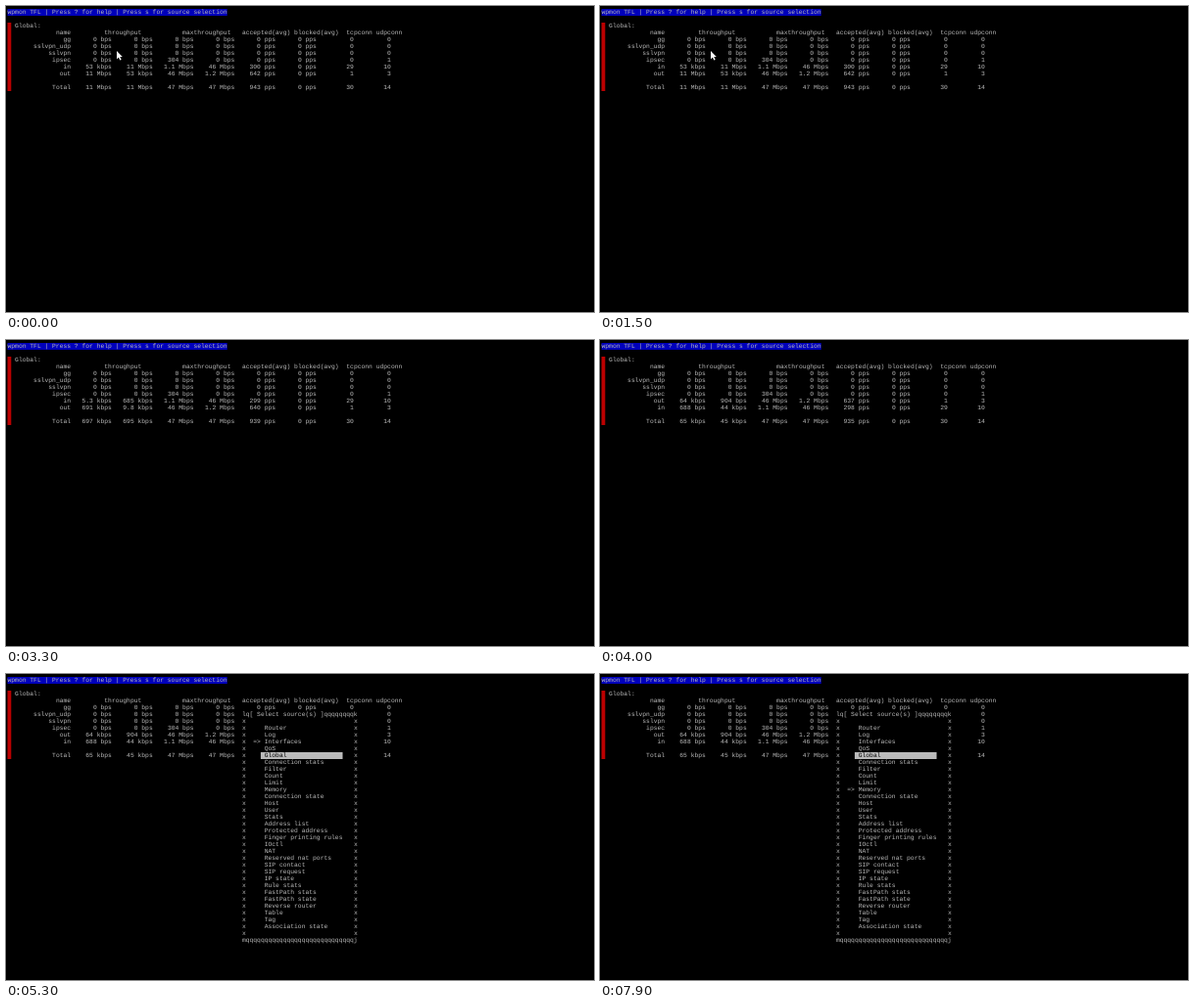
These frames come from a looping animation (600x313 px, 8000 ms). An HTML page:

```html
<!DOCTYPE html>
<html lang="en">
<head>
<meta charset="utf-8">
<title>Traffic monitor</title>
<style>
html, body { margin: 0; width: 100%; height: 100%; overflow: hidden; background: #000; }
svg { display: block; width: 600px; height: 313px; }
text {
  font-family: "Liberation Mono", monospace;
  font-size: 6.3323px;
  fill: #bbb;
  white-space: pre;
  text-rendering: geometricPrecision;
}
.dark { fill: #000; }
</style>
</head>
<body>
<svg id="stage" viewBox="0 0 600 313"></svg>
<script>
const LOOP = 8000;
const CELL = 3.8, LINE = 7, LEFT = 1.5, TOP = 3;
const MENU_AT = 4200;
const MENU_COL = 63, MENU_ROW = 5, MENU_WIDTH = 31;
const SELECTED = 4;

const stage = document.getElementById("stage");

// Right edge of each table column, in character cells
const edges = [17, 28, 39, 50, 61, 72, 83, 93, 103];
const heads = [[13, "name"], [26, "throughput"], [47, "maxthroughput"],
  [63, "accepted(avg)"], [77, "blocked(avg)"], [91, "tcpconn"], [99, "udpconn"]];

const idle = (name, peak = "0 bps", udp = "0") =>
  [name, "0 bps", "0 bps", peak, "0 bps", "0 pps", "0 pps", "0", udp];
const inRow = (a, b, pps) => ["in", a, b, "1.1 Mbps", "46 Mbps", pps, "0 pps", "29", "10"];
const outRow = (a, b, pps) => ["out", a, b, "46 Mbps", "1.2 Mbps", pps, "0 pps", "1", "3"];
const total = (a, b, pps) => ["Total", a, b, "47 Mbps", "47 Mbps", pps, "0 pps", "30", "14"];
const quiet = [idle("gg"), idle("sslvpn_udp"), idle("sslvpn"), idle("ipsec", "304 bps", "1")];

const samples = [
  { at: 0, rows: [inRow("53 kbps", "11 Mbps", "300 pps"),
                  outRow("11 Mbps", "53 kbps", "642 pps"), [],
                  total("11 Mbps", "11 Mbps", "943 pps")] },
  { at: 2500, rows: [inRow("5.3 kbps", "685 kbps", "299 pps"),
                     outRow("691 kbps", "9.8 kbps", "640 pps"), [],
                     total("697 kbps", "695 kbps", "939 pps")] },
  { at: 3500, rows: [outRow("64 kbps", "904 bps", "637 pps"),
                     inRow("688 bps", "44 kbps", "298 pps"), [],
                     total("65 kbps", "45 kbps", "935 pps")] }
];

const items = ["Router", "Log", "Interfaces", "QoS", "Global", "Connection stats",
  "Filter", "Count", "Limit", "Memory", "Connection state", "Host", "User", "Stats",
  "Address list", "Protected address", "Finger printing rules", "IOctl", "NAT",
  "Reserved nat ports", "SIP contact", "SIP request", "IP state", "Rule stats",
  "FastPath stats", "FastPath state", "Reverse router", "Table", "Tag",
  "Association state"];

// Times at which the arrow moves down one item
const keys = [4700, 5100, 5400, 5500, 5900, 6300, 6600, 7000, 7500];

const px = col => +(LEFT + col * CELL).toFixed(2);
const py = row => TOP + row * LINE;
const esc = s => s.replace(/&/g, "&amp;").replace(/</g, "&lt;").replace(/>/g, "&gt;");

function text(col, row, s, cls = "") {
  return `<text class="${cls}" x="${px(col)}" y="${py(row) + 5.2}">${esc(s)}</text>`;
}

function block(col, row, w, h, color) {
  return `<rect x="${px(col)}" y="${py(row)}" width="${w * CELL}" height="${h * LINE}" fill="${color}"/>`;
}

function table(rows) {
  const cells = [...quiet, ...rows].map((line, r) =>
    line.map((s, c) => text(edges[c] - s.length, r + 4, s)).join(""));
  return heads.map(([col, s]) => text(col, 3, s)).join("") + cells.join("");
}

function menu(pick) {
  const last = MENU_ROW + items.length + 3;
  const right = MENU_COL + MENU_WIDTH - 1;
  let out = block(MENU_COL, MENU_ROW, MENU_WIDTH, last - MENU_ROW + 1, "#000");
  out += text(MENU_COL, MENU_ROW, "lq[ Select source(s) ]" + "q".repeat(8) + "k");
  for (let r = MENU_ROW + 1; r < last; r++) {
    out += text(MENU_COL, r, "x") + text(right, r, "x");
  }
  out += text(MENU_COL, last, "m" + "q".repeat(MENU_WIDTH - 2) + "j");
  items.forEach((s, i) => {
    const row = MENU_ROW + 2 + i;
    const on = i === SELECTED;
    if (on) out += block(MENU_COL + 5, row, 22, 1, "#bbb");
    if (i === pick) out += text(MENU_COL + 3, row, "=>");
    out += text(MENU_COL + 6, row, s, on ? "dark" : "");
  });
  return out;
}

const title = "wpmon TFL | Press ? for help | Press s for source selection";
const pointer = '<path d="M113 46v8.4l1.9-1.8 1.5 3 1.3-.6-1.4-2.9h2.5z" fill="#fff"/>';

function draw(sample, pick) {
  stage.innerHTML =
    block(0, 0, title.length, 1, "#00b") + text(0, 0, title) +
    block(0, 2, 1, 10, "#b00") + text(2, 2, "Global:") +
    table(samples[sample].rows) +
    (sample === 0 ? pointer : "") +
    (pick >= 0 ? menu(pick) : "");
}

let shown = "";
function tick(now) {
  const t = now % LOOP;
  const sample = samples.filter(s => t >= s.at).length - 1;
  const pick = t < MENU_AT ? -1 : keys.filter(k => t >= k).length;
  const state = sample + "/" + pick;
  if (state !== shown) {
    shown = state;
    draw(sample, pick);
  }
  requestAnimationFrame(() => tick(performance.now() - start));
}

const start = performance.now();
tick(0);
</script>
</body>
</html>
```
